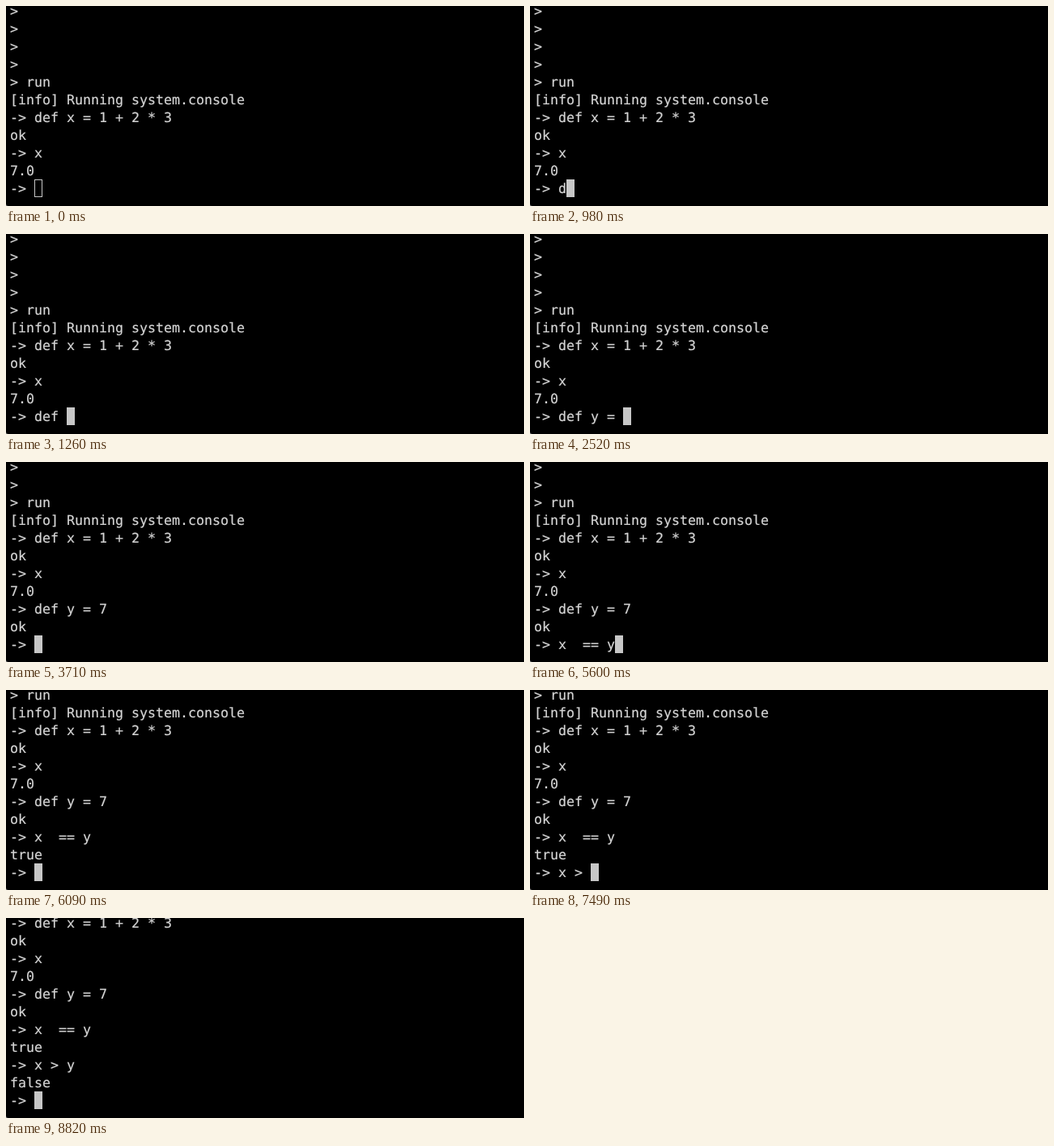
Recreate the animation shown at these times as an HTML page. Size 640 px wide and 248 px high, loop 9870 ms.

```html
<!DOCTYPE html>
<html lang="en">
<head>
<meta charset="utf-8">
<title>Console session</title>
<style>
  html, body { margin: 0; width: 100%; height: 100%; overflow: hidden; background: #000; }
  svg { display: block; width: 640px; height: 248px; }
  text {
    font: 16.61px "DejaVu Sans Mono", monospace;
    fill: #d4d4d4; stroke: #d4d4d4; stroke-width: 0.2;
    white-space: pre; text-rendering: geometricPrecision;
  }
</style>
</head>
<body>
<svg id="stage" viewBox="0 0 640 248">
  <rect width="640" height="248" fill="#000"/>
  <path d="M0 245 Q0 248 3 248 H0 Z" fill="#888"/>
  <g id="rows"></g>
  <rect id="cursor"/>
</svg>
<script>
const LOOP = 9870;
const ROWS = 11, LEFT = 5, CELL = 10, LINE = 22, LAST_BASELINE = 232;
const CURSOR_TOP = 215;
const FOCUS_TIME = 770;
const PROMPT = '-> ';
const HISTORY = [
  '>', '>', '>', '>', '> run',
  '[info] Running system.console',
  '-> def x = 1 + 2 * 3', 'ok', '-> x', '7.0'
];

// Each command: the text, the time of every keystroke, then enter and its reply.
const COMMANDS = [
  { text: 'def y = 7', keys: [980, 1050, 1120, 1260, 1960, 2170, 2450, 2520, 3080], enter: 3710, reply: 'ok' },
  { text: 'x  == y', keys: [4130, 4200, 4760, 5040, 5180, 5250, 5600], enter: 6090, reply: 'true' },
  { text: 'x > y', keys: [6860, 6930, 7350, 7490, 8260], enter: 8820, reply: 'false' }
];

const SVG_NS = 'http://www.w3.org/2000/svg';
const cursor = document.getElementById('cursor');

function setAttrs(node, attrs) {
  for (const name in attrs) node.setAttribute(name, attrs[name]);
}

const rows = Array.from({ length: ROWS }, (_, i) => {
  const row = document.createElementNS(SVG_NS, 'text');
  setAttrs(row, { x: LEFT, y: LAST_BASELINE - (ROWS - 1 - i) * LINE });
  return document.getElementById('rows').appendChild(row);
});

function screenAt(time) {
  const lines = [...HISTORY];
  let input = '';
  for (const { text, keys, enter, reply } of COMMANDS) {
    if (time < enter) {
      input = text.slice(0, keys.filter(key => key <= time).length);
      break;
    }
    lines.push(PROMPT + text, reply);
  }
  lines.push(PROMPT + input);
  return lines.slice(-ROWS);
}

function drawCursor(column, focused) {
  const inset = focused ? 0 : 0.5;
  setAttrs(cursor, {
    x: LEFT + column * CELL + inset,
    y: CURSOR_TOP + inset,
    width: CELL - 2 * inset,
    height: LINE - 2 * inset,
    fill: focused ? '#c7c7c7' : 'none',
    stroke: focused ? 'none' : '#c7c7c7'
  });
}

function render(time) {
  const lines = screenAt(time);
  rows.forEach((row, i) => {
    if (row.textContent !== lines[i]) row.textContent = lines[i];
  });
  drawCursor(lines[ROWS - 1].length, time >= FOCUS_TIME);
}

const start = performance.now();
function tick() {
  render((performance.now() - start) % LOOP);
  requestAnimationFrame(tick);
}
tick();
</script>
</body>
</html>
```
